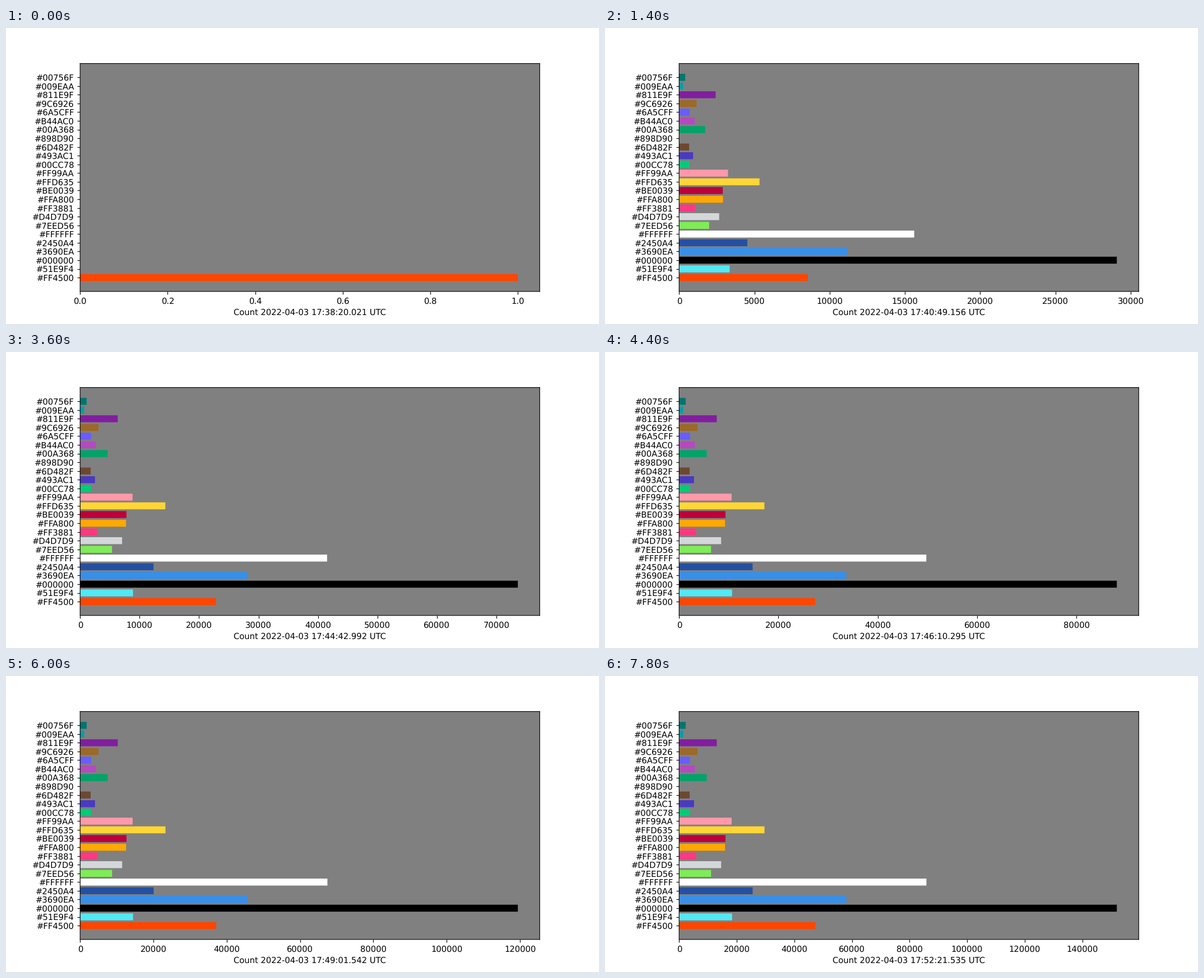
Write a matplotlib script that moves like this. It is 1058 px wide and 529 px high and loops after 8 s.

```python
import numpy as np
import matplotlib.pyplot as plt
from matplotlib.animation import FuncAnimation

FRAMES, STEP_MS = 40, 200
SETTLE = 3  # steps over which early shares drift to their lasting level

# Soft edges and unhinted glyphs, as in a downscaled plot.
plt.rcParams.update({"path.snap": False, "text.hinting": "none"})

# Bar length as a percentage of the leading bar: early on, and once settled.
SHARES = {
    "#FF4500": (24.6, 31.1),
    "#51E9F4": (10.0, 12.1),
    "#000000": (100, 100),
    "#3690EA": (38.9, 38.2),
    "#2450A4": (12.2, 16.8),
    "#FFFFFF": (45.9, 56.5),
    "#7EED56": (5.6, 7.3),
    "#D4D7D9": (7.9, 9.6),
    "#FF3881": (3.0, 3.9),
    "#FFA800": (8.7, 10.5),
    "#BE0039": (8.2, 10.6),
    "#FFD635": (15.2, 19.5),
    "#FF99AA": (8.8, 12.0),
    "#00CC78": (2.1, 2.5),
    "#493AC1": (2.6, 3.4),
    "#6D482F": (2.0, 2.4),
    "#898D90": (0, 0),
    "#00A368": (4.9, 6.3),
    "#B44AC0": (3.5, 3.6),
    "#6A5CFF": (2.2, 2.5),
    "#9C6926": (3.4, 4.2),
    "#811E9F": (7.6, 8.6),
    "#009EAA": (0.7, 0.9),
    "#00756F": (1.1, 1.5),
}
COLORS = list(SHARES)
EARLY, LATE = np.array(list(SHARES.values())).T / 100

# Key points: step, leading count, milliseconds after 17:38.
STEPS = [0, 3, 11, 18, 22, 30, 39]
LEAD = [1, 14113, 44030, 73603, 88120, 119400, 152000]
CLOCK = [20021, 80956, 257356, 402992, 490295, 661542, 861535]


def counts_at(step):
    if step == 0:  # a single first event
        return np.eye(len(COLORS))[0]
    settled = 1 - np.exp(-max(step - STEPS[1], 0) / SETTLE)
    return np.interp(step, STEPS, LEAD) * (EARLY + (LATE - EARLY) * settled)


def label_at(step):
    seconds, ms = divmod(round(np.interp(step, STEPS, CLOCK)), 1000)
    minutes, seconds = divmod(seconds, 60)
    return f"Count 2022-04-03 17:{38 + minutes}:{seconds:02d}.{ms:03d} UTC"


fig, ax = plt.subplots(figsize=(10, 5), dpi=105.8)
ax.set_facecolor("gray")
bars = ax.barh(COLORS, counts_at(0), color=COLORS)


def draw(step):
    counts = counts_at(step)
    for bar, count in zip(bars, counts):
        bar.set_width(count)
    ax.set_xlim(0, counts.max() * 1.05)
    ax.set_xlabel(label_at(step))
    return list(bars)


anim = FuncAnimation(fig, draw, frames=FRAMES, interval=STEP_MS,
                     init_func=lambda: draw(0), repeat=True, repeat_delay=0)
plt.show()
```
